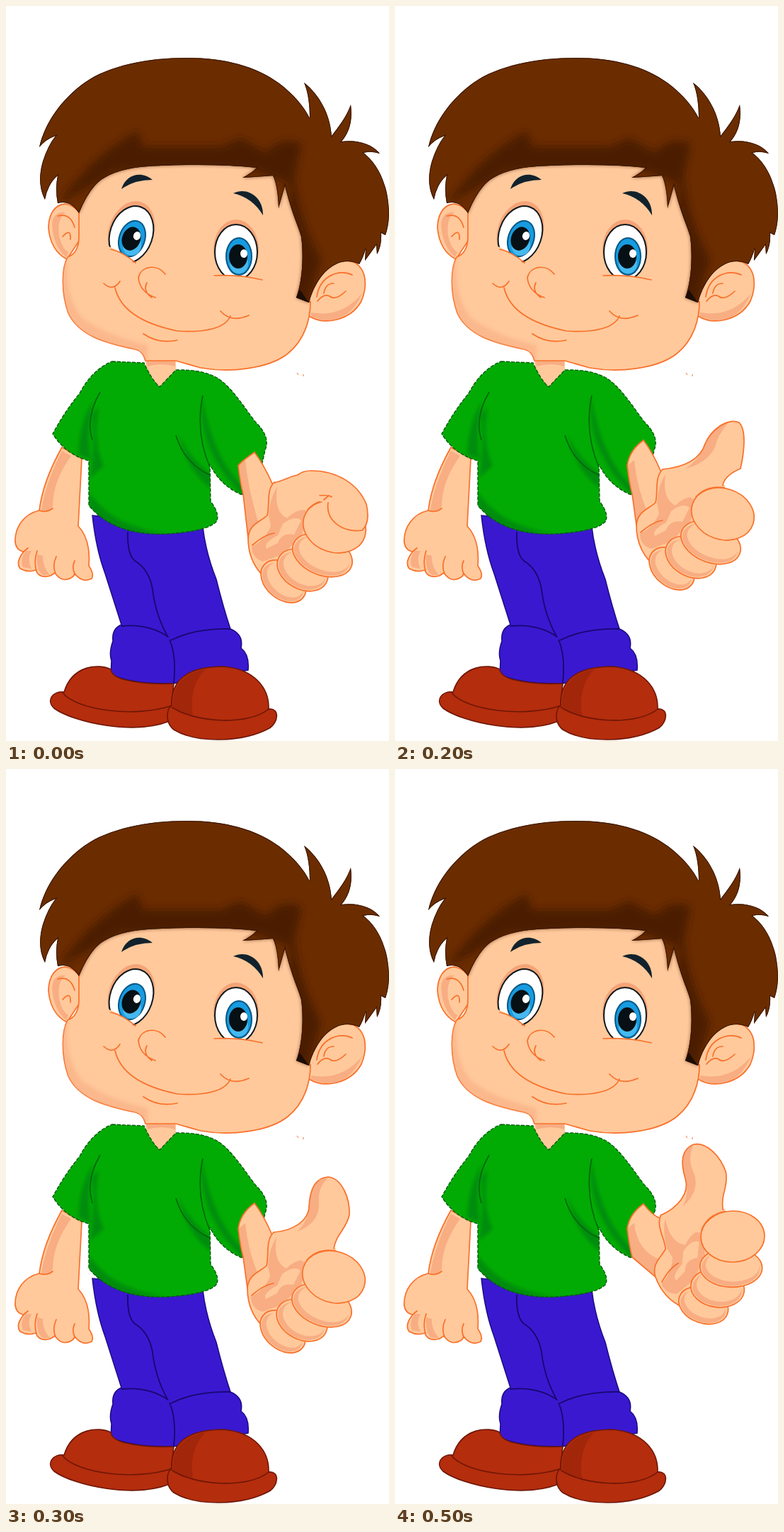
Recreate the animation shown at these times as an HTML page. Size 541 by 1036 pixels, loop 0.6 s.

```html
<!DOCTYPE html>
<html lang="en">
<head>
<meta charset="utf-8">
<title>Thumbs up</title>
<style>
  html, body { margin: 0; width: 100%; height: 100%; overflow: hidden; background: #fff; }
  svg { display: block; width: 100vw; height: 100vh; }
  .skin { fill: #ffc99b; }
  .shade { fill: #f8ad83; }
  .line { fill: none; }
  .skin.edge, .line { stroke: #f9702a; stroke-width: 1.7; stroke-linecap: round; stroke-linejoin: round; }
  .fold { fill: #008c0b; }
  .seam { fill: none; stroke: #17086e; stroke-width: 1.8; }
  .shoe { fill: #b42d0d; stroke: #6e1605; stroke-width: 1.6; }
</style>
</head>
<body>
<svg viewBox="0 0 541 1036" preserveAspectRatio="none">
  <defs>
    <filter id="soft" x="-20%" y="-20%" width="140%" height="140%"><feGaussianBlur stdDeviation="6"/></filter>
    <filter id="haze" x="-20%" y="-20%" width="140%" height="140%"><feGaussianBlur stdDeviation="2.5"/></filter>
    <path id="hair" d="M47 199C55 164 78 132 111 108C145 84 200 73 255 73C310 73 353 85 386 109C407 125 421 142 429 158C429 140 427 122 421 108C443 125 458 153 460 183C470 170 481 156 487 139C490 162 485 178 474 191C495 188 517 194 528 208Q514 204 505 207C525 222 534 246 538 264C543 290 541 309 536 323L530 320Q531 338 524 350L523 337L507 359L508 342Q505 354 499 364C470 350 440 375 428 418L410 411C418 390 421 355 417 325C413 310 404 294 394 253L385 285Q384 253 377 239Q352 241 334 242Q348 235 354 228Q302 222 220 225Q165 226 139 242Q119 253 103 292Q91 273 73 278Q69 258 73 239Q59 251 55 273Q43 250 52 219Q59 197 70 183Q56 188 47 199Z"/>
    <path id="face" d="M103 292Q115 240 160 205H420Q434 330 428 415L430 417C430 440 423 470 398 490C370 512 315 517 275 510L240 500H197Q194 487 183 484C140 475 103 465 88 433C78 405 78 370 87 354Q103 348 103 325Z"/>
    <path id="shirt" d="M150 501L195 503Q205 526 217 537L240 513Q275 512 296 523C316 533 336 565 352 586Q374 607 366 626L354 680Q345 692 331 688Q302 675 288 646L289 698Q303 717 297 727Q285 739 240 743C190 748 145 738 117 704L117 641Q84 632 66 603Q84 570 104 546Q122 512 150 501Z"/>
    <clipPath id="inHair"><use href="#hair"/></clipPath>
    <clipPath id="inFace"><use href="#face"/></clipPath>
    <clipPath id="inShirt"><use href="#shirt"/></clipPath>
  </defs>

  <!-- resting arm -->
  <path class="skin edge" d="M79 622Q52 670 47 711C25 716 12 735 13 756Q15 768 25 769Q13 784 20 793Q31 799 42 795Q47 808 63 803L69 799Q80 815 95 804L97 800Q108 814 121 807Q125 801 117 789Q120 752 102 733L107 638Z"/>
  <path class="shade" d="M79 627Q55 675 50 711Q60 714 66 705Q66 670 92 634ZM28 768Q19 780 24 791L36 793Q29 780 36 768ZM44 773Q42 795 52 802L62 802Q51 790 52 775Z"/>
  <path class="line" d="M47 711Q57 715 66 708M44 768Q39 782 43 796M71 776Q65 789 70 800M97 782Q92 792 98 802M25 769L31 764"/>

  <!-- trousers and shoes -->
  <path fill="#3a18d0" stroke="#1c0b83" stroke-width="1.5" d="M122 718Q127 765 140 800L163 872Q149 878 151 895Q145 912 149 923L148 942Q177 956 237 955L342 936Q344 914 332 905Q336 886 317 878Q307 848 297 808Q282 770 278 734Z"/>
  <path class="seam" d="M172 741Q171 773 182 782Q202 794 207 822Q211 858 229 890M163 874Q201 870 229 889M317 878Q266 877 233 894M231 893Q241 916 237 954"/>
  <path class="shoe" d="M82 967C94 928 132 927 148 935Q149 944 165 949Q197 957 237 955L231 1008C180 1028 96 1010 68 990C56 979 66 965 82 967Z"/>
  <path class="shoe" style="fill:none" d="M80 968C99 992 180 1004 235 986"/>
  <path class="shoe" d="M234 986C232 940 272 931 307 931C353 935 372 963 371 991C387 989 385 1010 372 1018C335 1038 270 1040 237 1020C224 1010 227 990 234 986Z"/>
  <path fill="#a1260a" d="M236 987C234 950 262 938 282 935Q258 958 264 1000Q246 996 236 987Z"/>
  <path class="shoe" style="fill:none" d="M234 988C265 1010 342 1015 371 991"/>

  <!-- shirt -->
  <path class="skin" d="M197 492H240V513L217 540L197 510Z"/>
  <path class="shade" d="M198 499H239V508Q220 502 200 508Z"/>
  <use href="#shirt" fill="#01ab04"/>
  <g clip-path="url(#inShirt)">
    <path class="fold" filter="url(#haze)" d="M102 632Q104 585 124 556Q112 600 120 640ZM122 575Q126 625 119 665L138 648Q122 615 131 565ZM243 600Q254 655 290 680V660Q255 635 243 600ZM277 550Q270 625 334 690L337 678Q292 640 277 550ZM117 685Q150 735 230 744H160Q122 730 117 700Z"/>
    <path fill="none" stroke="#04620a" stroke-width="1.5" d="M133 544Q112 580 122 612M278 549Q267 601 288 650M240 605Q252 645 288 661"/>
  </g>
  <use href="#shirt" fill="none" stroke="#075c0c" stroke-width="1.4" stroke-dasharray="5 2"/>

  <!-- head -->
  <path class="skin edge" d="M104 292C85 267 60 281 60 313Q63 345 86 357L104 330Z"/>
  <path class="shade" d="M65 306Q68 289 84 291Q72 300 75 324Q79 342 88 347L85 354Q66 338 65 306Z"/>
  <path class="line" d="M73 296Q91 291 97 312M80 325Q92 312 91 329"/>
  <path class="skin edge" d="M428 420C432 371 464 353 491 361C511 371 510 397 502 416C487 443 450 451 428 437Z"/>
  <path class="shade" d="M431 432Q474 440 503 405Q486 445 450 443L431 438Z"/>
  <path class="line" d="M439 410C443 380 471 370 489 379M440 416Q449 405 457 409Q465 416 480 402M449 405Q451 391 463 391"/>
  <use href="#face" class="skin edge"/>
  <g clip-path="url(#inFace)">
    <path class="shade" opacity=".6" filter="url(#haze)" d="M87 352Q82 410 108 440Q145 466 200 478V500Q120 480 88 442Q76 405 80 350Z"/>
    <use href="#hair" fill="#4b1f02" opacity=".65" filter="url(#haze)"/>
  </g>
  <use href="#hair" fill="#6b2d00"/>
  <g clip-path="url(#inHair)">
    <path filter="url(#soft)" fill="#4b1f02" d="M73 280Q120 210 186 176L194 198H304L331 186L368 206Q388 182 418 194L408 240Q414 300 445 357L425 425H400V250L350 232H160Z"/>
    <use href="#hair" fill="none" stroke="#3a1600" stroke-width="2"/>
  </g>
  <path d="M410 411L415 400L428 418Z" fill="#1c0d05"/>

  <!-- features -->
  <g id="eyes"></g>
  <path class="skin" d="M138 337Q158 341 183 364L150 376Z"/>
  <path class="skin" d="M292 381Q328 378 364 387V392H292Z"/>
  <path class="line" d="M148 343Q164 346 183 362M294 380Q328 378 362 386"/>
  <path fill="#12222c" d="M163 258C169 238 190 231 207 245Q181 245 163 258ZM321 264C341 254 364 270 363 295Q348 270 321 264Z"/>
  <path class="line" d="M225 378C213 363 191 366 187 383Q189 403 211 411M206 411Q193 402 199 390"/>
  <path class="line" d="M154 397C162 432 198 449 242 458C281 461 310 454 317 437M138 391Q151 403 161 388M303 430Q318 447 343 436M194 462Q216 477 242 471"/>
  <path stroke="#f9702a" d="M411 517L413 520M420 519V522"/>

  <g id="arm"></g>
</svg>
<script>
const FRAME_MS = 100;
const KNUCKLE = { x: 463, y: 716 };

const ellipse = (cls, cx, cy, rx, ry, turn = 0, extra = '') =>
  `<ellipse class="${cls}" cx="${cx}" cy="${cy}" rx="${rx}" ry="${ry}" transform="rotate(${turn} ${cx} ${cy})" ${extra}/>`;
const path = (cls, d) => `<path class="${cls}" d="${d}"/>`;

function eye(x, y, rx, ry, turn, irisX, irisY) {
  const fill = color => `fill="${color}"`;
  return ellipse('', x, y - 4, rx + 2, ry + 3, turn, fill('#f5a477'))
    + ellipse('', x, y, rx, ry, turn, 'fill="#fff" stroke="#10181c" stroke-width="2"')
    + ellipse('', irisX, irisY, 18, 26, turn, 'fill="#179be0" stroke="#075783" stroke-width="2"')
    + ellipse('', irisX, irisY + 10, 13, 14, turn, fill('#45b9f0'))
    + ellipse('', irisX - 1, irisY, 13, 17, turn, fill('#071014'))
    + ellipse('', irisX + 7, irisY - 4, 5, 6, turn, fill('#fff'));
}
document.getElementById('eyes').innerHTML =
  eye(177, 322, 30, 41, 19, 178, 328) + eye(325, 347, 30, 39, 0, 329, 353);

const thumbs = {
  folded: {
    outline: 'M378 654C394 650 399 645 411 643Q418 637 430 637C466 637 496 655 508 684Q514 710 502 721C480 725 450 711 454 682',
    close: 'L441 680Z',
    shade: '',
  },
  level: {
    outline: 'M378 653C409 650 426 638 441 622C457 605 476 597 490 599C502 607 500 630 497 645Q488 667 460 667L465 676',
    close: 'L420 695Z',
    shade: 'M441 622C457 605 476 597 490 599Q465 612 452 628Q435 648 410 652Q428 638 441 622Z',
  },
  raised: {
    outline: 'M378 653C408 650 431 640 438 617C446 598 470 580 486 587C497 598 493 630 488 652Q465 662 463 676',
    close: 'L420 695Z',
    shade: 'M438 617C446 598 460 587 472 586Q455 605 452 622Q440 645 410 652Q430 640 438 617Z',
  },
  upright: {
    outline: 'M378 653C404 651 427 638 428 617C429 596 435 576 455 575C475 577 486 606 485 628C481 649 467 654 463 676',
    close: 'L420 695Z',
    shade: 'M428 617C429 596 435 576 455 576Q440 590 442 612Q443 640 411 652Q427 638 428 617Z',
  },
};

// dx, dy and turn place the whole hand; cuffY is the upper end of the forearm
const poses = [
  { thumb: 'folded', dx: 1, dy: 18, turn: 0, cuffY: 629 },
  { thumb: 'level', dx: 1, dy: 18, turn: 0, cuffY: 629 },
  { thumb: 'raised', dx: 0, dy: 0, turn: 0, cuffY: 612 },
  { thumb: 'upright', dx: 0, dy: 0, turn: 0, cuffY: 612 },
  { thumb: 'upright', dx: 8, dy: -29, turn: -10, cuffY: 612 },
  { thumb: 'upright', dx: 14, dy: -57, turn: -20, cuffY: 613 },
];

function place({ dx, dy, turn }, x, y) {
  const a = turn * Math.PI / 180, u = x - KNUCKLE.x, v = y - KNUCKLE.y;
  const px = KNUCKLE.x + dx + u * Math.cos(a) - v * Math.sin(a);
  const py = KNUCKLE.y + dy + u * Math.sin(a) + v * Math.cos(a);
  return `${px.toFixed(1)} ${py.toFixed(1)}`;
}

const finger = (x, y, rx, ry, turn) =>
  ellipse('skin edge', x, y, rx, ry, turn)
  + ellipse('shade', x - 1, y + 1, rx - 3, ry - 3, turn)
  + ellipse('skin', x + 3, y - 2, rx - 6, ry - 5, turn);

function forearm(pose) {
  const low = place(pose, 341, 732), high = place(pose, 376, 657), heel = place(pose, 372, 735);
  const inner = place(pose, 356, 712);
  const left = `M328 648Q331 674 335 688L${low}`;
  const right = `M351 ${pose.cuffY}Q364 ${pose.cuffY + 17} ${high}`;
  return path('skin', `${left}L${heel}L${high}Q364 ${pose.cuffY + 17} 351 ${pose.cuffY}Q331 ${pose.cuffY + 14} 328 648Z`)
    + path('shade', `${left}L${inner}Q342 680 338 640L328 648Z`)
    + path('line', left) + path('line', right)
    + path('line', `M328 648Q331 ${pose.cuffY + 14} 351 ${pose.cuffY}`);
}

function hand({ thumb, dx, dy, turn }) {
  const folded = thumb === 'folded';
  const { outline, close, shade } = thumbs[thumb];
  const palm = path('skin', 'M341 732C342 712 360 708 368 700C372 685 366 660 378 653L430 645L466 676L470 720L440 750L380 805L362 785Q341 764 341 732Z')
    + path('shade', 'M370 700Q372 675 382 660Q377 695 396 704Q413 688 426 694L417 728L390 755L362 765Q346 760 346 744Q365 735 373 715Z')
    + path('skin', 'M390 712Q407 699 416 707L406 727Q388 724 383 739L367 747Q362 739 383 728Z')
    + path('line', 'M362 785Q341 764 341 732C342 712 360 708 368 700C372 685 366 665 378 653M347 742Q364 727 378 725');
  const thumbShape = path('skin', outline + close) + path('shade', shade) + path('line', outline);
  const crease = path('line', 'M442 672Q455 671 459 674M448 678L455 672');
  const fingers = finger(391, 793, 36, 25, 40) + finger(418, 777, 38, 27, 28) + finger(446, 756, 44, 28, 22);
  const index = ellipse('skin edge', KNUCKLE.x, KNUCKLE.y, 45, 36, 18)
    + path('line', 'M425 692Q440 675 465 679');
  const parts = folded ? palm + fingers + index + thumbShape + crease : palm + thumbShape + fingers + index;
  return `<g transform="translate(${dx} ${dy}) rotate(${turn} ${KNUCKLE.x} ${KNUCKLE.y})">${parts}</g>`;
}

const arm = document.getElementById('arm');
arm.innerHTML = poses.map(pose => `<g visibility="hidden">${forearm(pose)}${hand(pose)}</g>`).join('');

const start = performance.now();
function draw(now) {
  const current = Math.floor(Math.max(0, now - start) / FRAME_MS) % poses.length;
  [...arm.children].forEach((g, i) => g.setAttribute('visibility', i === current ? 'visible' : 'hidden'));
  requestAnimationFrame(draw);
}
draw(start);
</script>
</body>
</html>
```
